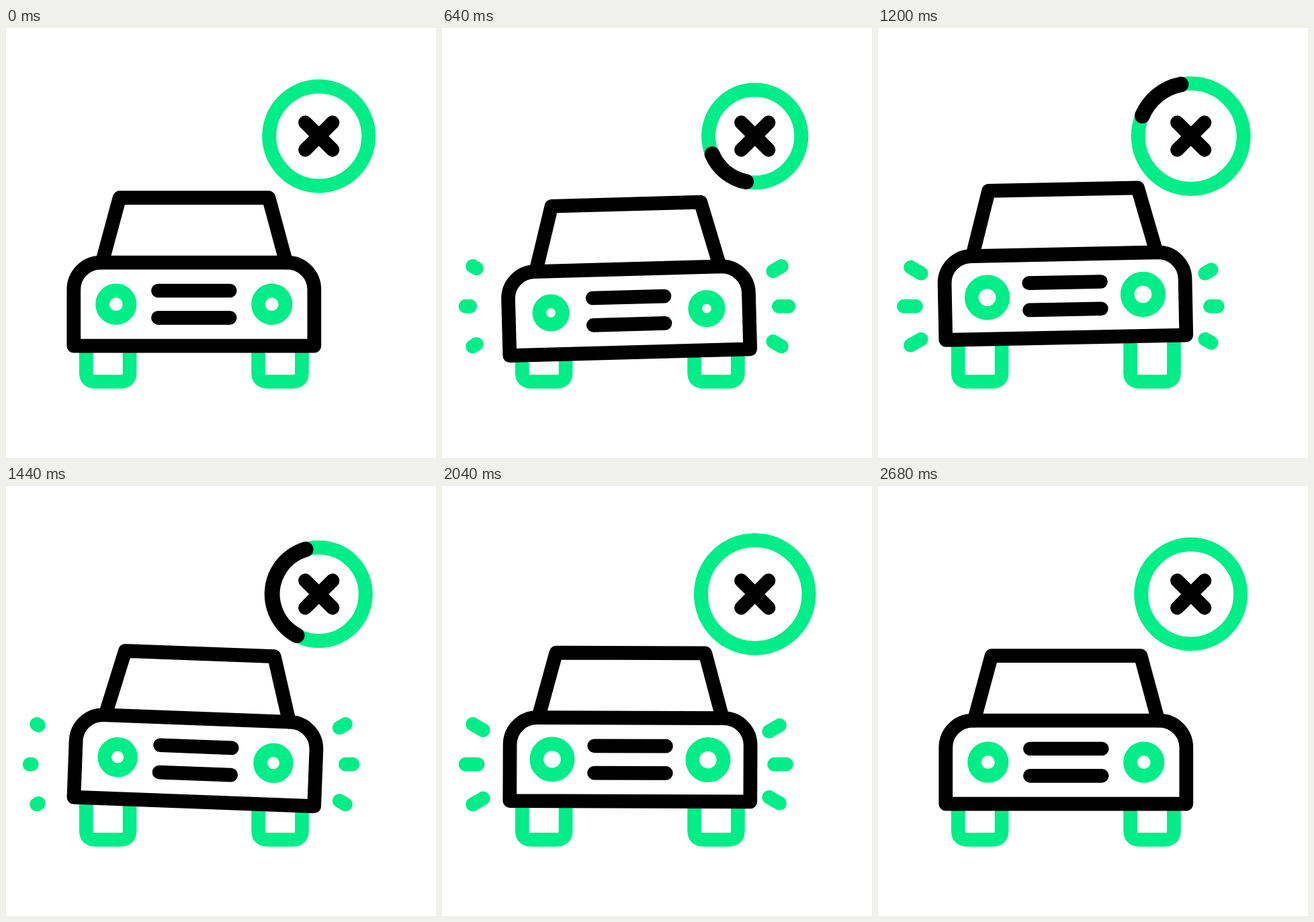
Recreate the animation shown at these times as an HTML page with a canvas. Size 640 by 640 pixels, loop 3 s.

```html
<!DOCTYPE html>
<html lang="en">
<head>
<meta charset="utf-8">
<title>Car alarm</title>
<style>
  html, body { margin: 0; width: 100%; height: 100%; overflow: hidden; background: #fff; }
  canvas { display: block; width: 640px; height: 640px; }
</style>
</head>
<body>
<canvas id="stage" width="640" height="640"></canvas>
<script>
const ctx = document.getElementById('stage').getContext('2d');
const GREEN = '#00ed88', BLACK = '#000', LINE = 20.7;
const LOOP = 3000, STEP = 40, DEG = Math.PI / 180;

function ease(t, start, duration) {
  const u = Math.min(1, Math.max(0, (t - start) / duration));
  return u * u * (3 - 2 * u);
}

// Eases through [time, value] keys
function track(t, keys) {
  return keys.slice(1).reduce((value, [time, next], i) => {
    const [before, last] = keys[i];
    return value + (next - last) * ease(t, before, time - before);
  }, keys[0][1]);
}

// Alternates between -1 and 1 at the given times, resting at 0 on both ends
function swing(t, times) {
  const rest = i => i === 0 || i === times.length - 1;
  return track(t, times.map((time, i) => [time, rest(i) ? 0 : (-1) ** i]));
}

function stroke(color, path, width = LINE) {
  ctx.strokeStyle = color;
  ctx.lineWidth = width;
  ctx.stroke(path);
}

function line(color, x1, y1, x2, y2) {
  const path = new Path2D();
  path.moveTo(x1, y1);
  path.lineTo(x2, y2);
  stroke(color, path);
}

function arc(color, x, y, radius, from = 0, to = 360, width = LINE) {
  const path = new Path2D();
  path.arc(x, y, radius, from * DEG, to * DEG);
  stroke(color, path, width);
}

const wheel = x => new Path2D(`M${x} 455v58q0 13.4 13.4 13.4h38q13.4 0 13.4-13.4v-58`);
const wheels = [119.3, 375.6].map(wheel);
const roof = new Path2D('M143 349L169 252.6H391L417 349');
const body = new Path2D('M100.8 473.2v-84a40 40 0 0 1 40-40h278a40 40 0 0 1 40 40v84Z');

// Three rays fan out on each side; the right side (1) lags behind the left (-1)
function drawRays(t, side) {
  for (let burst = 0; burst < 3; burst++) {
    const age = t - 200 - 760 * burst - (side > 0 ? 80 : 0);
    if (age <= 0 || age >= 520) continue;
    const head = 21.5 * ease(age, 0, 320), tail = 21.5 * ease(age, 240, 320);
    for (const row of [-1, 0, 1]) {
      const x = 275.5 + side * (219 - 7.7 * Math.abs(row)), y = 414.2 + 49 * row;
      const dx = side * Math.cos(30 * row * DEG), dy = Math.sin(30 * row * DEG);
      line(GREEN, x + dx * tail, y + dy * tail, x + dx * head, y + dy * head);
    }
  }
}

function drawCar(t) {
  const bounce = track(t, [[320, 0], [700, 10.2], [1280, -13.7], [1560, 3.5], [1900, -6.4], [2240, 0]]);
  const tilt = 3.15 * swing(t, [320, 960, 1600, 2120]);
  const lampRadius = 20.25 + 3 * swing(t, [0, 640, 1200, 1600, 2080, 2680]);
  wheels.forEach(path => stroke(GREEN, path));
  ctx.save();
  ctx.translate(279.8, 473.2 + bounce);
  ctx.rotate(tilt * DEG);
  ctx.translate(-279.8, -473.2);
  ctx.fillStyle = '#fff';
  ctx.fill(body);
  for (const x of [163.8, 395.7]) arc(GREEN, x, 411.2, lampRadius);
  stroke(BLACK, roof);
  stroke(BLACK, body);
  for (const y of [391, 431.3]) line(BLACK, 226.4, y, 333.2, y);
  ctx.restore();
}

function drawBadge(t) {
  const x = 465.7, y = 161, arm = 20.3;
  const radius = 74 + 6.5 * swing(t, [0, 520, 1080, 1560, 2080, 2680]);
  arc(GREEN, x, y, radius, 0, 360, 21);
  for (const start of [520, 1240]) {
    if (t <= start || t >= start + 800) continue;
    const turn = 90 + 180 * ease(t, start, 800);
    const tail = turn + 360 * ease(t, start + 320, 480);
    const head = turn + 360 * ease(t, start, 480);
    arc(BLACK, x, y, radius, tail, head, 23);
  }
  for (const dy of [arm, -arm]) line(BLACK, x - arm, y - dy, x + arm, y + dy);
}

function draw() {
  const t = Math.floor(performance.now() % LOOP / STEP) * STEP;
  ctx.clearRect(0, 0, 640, 640);
  ctx.lineCap = ctx.lineJoin = 'round';
  drawRays(t, -1);
  drawRays(t, 1);
  drawCar(t);
  drawBadge(t);
  requestAnimationFrame(draw);
}
draw();
</script>
</body>
</html>
```
